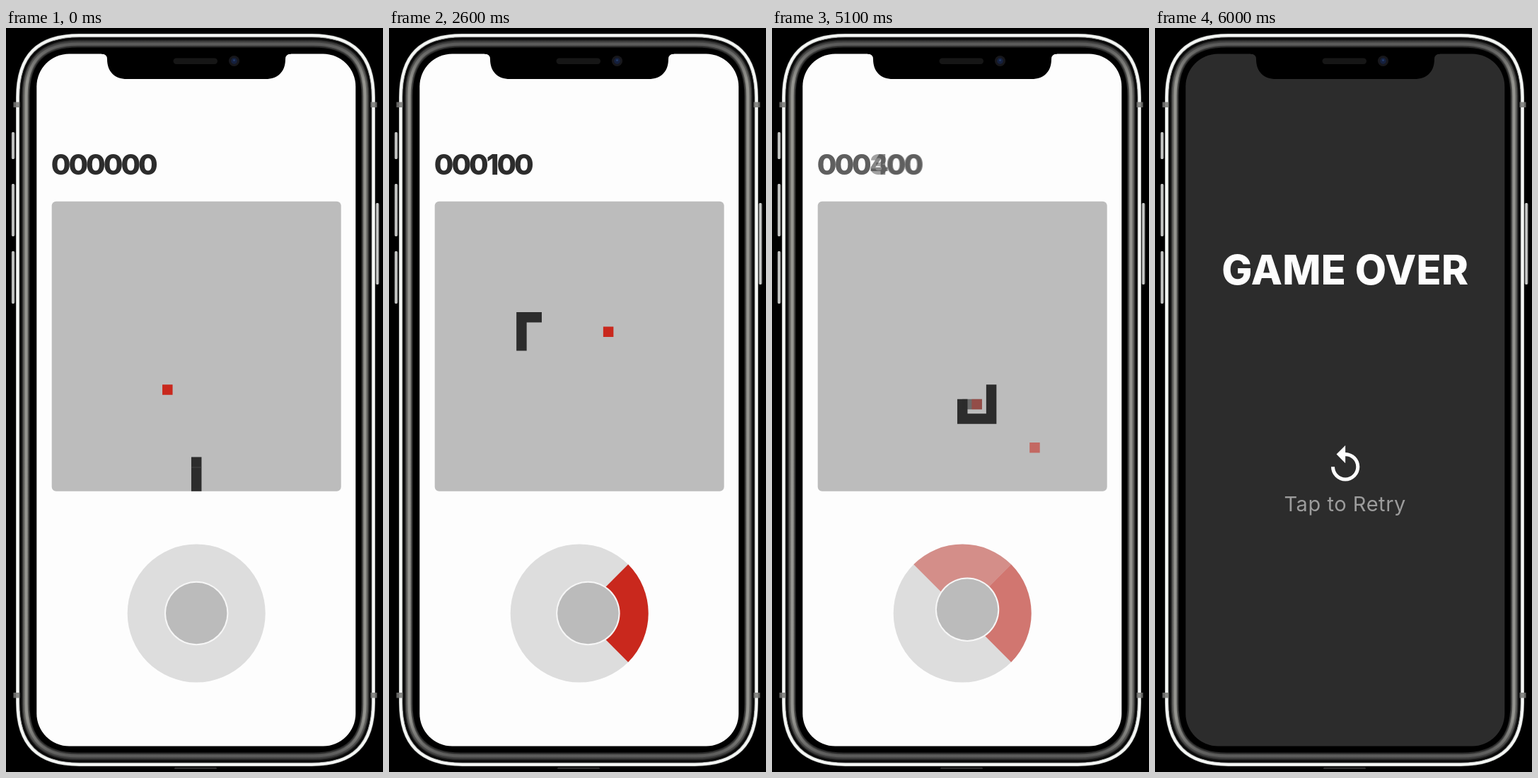
An HTML page with a canvas for the animation above (6200 ms loop, 533 by 1050 pixels).

```html
<!DOCTYPE html>
<html lang="en">
<head>
<meta charset="utf-8">
<title>Snake</title>
<style>
  html, body { margin: 0; width: 100%; height: 100%; overflow: hidden; background: #000; }
  canvas { display: block; }
</style>
</head>
<body>
<canvas id="stage" width="533" height="1050"></canvas>
<script>
const ctx = document.getElementById('stage').getContext('2d');
const LOOP = 6200, FRAME = 100;
const DARK = '#2c2c2c', LIGHT = '#fdfdfd', RED = '#c9281d', GREY = '#bcbcbc';
const CELL = 20.45, BLOCK = 14.5, MID = { x: 269.2, y: 449.2 };
const WHEEL = { x: 269.2, y: 826, r: 97.5 };
const FONT = 'Inter, "Open Sans", sans-serif';

const DIRS = { U: [0, -1], D: [0, 1], L: [-1, 0], R: [1, 0] };
const LEAD = 3; // cells behind the head's first position
const moves = [...'UUU' + 'UUUUU' + 'LLLL' + 'UUUUU' + 'RRRRRR' + 'DDDDDDD' + 'LL' + 'U' + 'RR'];
const path = [[0, 8 + LEAD]];
for (const m of moves) {
  const [x, y] = path.at(-1), [dx, dy] = DIRS[m];
  path.push([x + dx, y + dy]);
}
const STEPS = moves.length - LEAD;
const meals = [7, 21, 29, 31]; // steps on which food is reached
const foods = [...meals.map(k => path[k + LEAD]), [5, 7]];

const clamp = v => Math.min(1, Math.max(0, v));
const mix = (a, b, p) => a + (b - a) * p;
const grey = v => `rgb(${v},${v},${v})`;
const smooth = v => (v = clamp(v), v * v * (3 - 2 * v));
const eaten = k => meals.filter(m => m <= k).length;
const center = ([x, y]) => [MID.x + x * CELL, MID.y + y * CELL];

function cellAt(i) {
  i += LEAD;
  const n = Math.floor(i), a = path[n], b = path[n + 1] || a;
  return [mix(a[0], b[0], i - n), mix(a[1], b[1], i - n)];
}

function box(x, y, w, h, r, fill) {
  ctx.beginPath();
  ctx.roundRect(x, y, w, h, r);
  ctx.fillStyle = fill;
  ctx.fill();
}

function disc(x, y, r, fill) {
  ctx.beginPath();
  ctx.arc(x, y, r, 0, 7);
  ctx.fillStyle = fill;
  ctx.fill();
}

// Outline of the phone with continuous-curvature corners.
function rim(inset, width, color) {
  const cx = 268, cy = 525, w = cx - inset, h = cy - inset + 6;
  const e = 1.19 * (90 - inset), c = e * .32;
  ctx.beginPath();
  for (const [sx, sy] of [[-1, -1], [1, -1], [1, 1], [-1, 1]]) {
    const at = (dx, dy) => [cx + sx * (w - dx), cy + sy * (h - dy)];
    const curve = [at(0, e), at(0, c), at(c, 0), at(e, 0)];
    if (sx !== sy) curve.reverse();
    const [from, a, b, to] = curve;
    ctx.lineTo(...from);
    ctx.bezierCurveTo(...a, ...b, ...to);
  }
  ctx.closePath();
  ctx.lineWidth = width;
  ctx.strokeStyle = color;
  ctx.stroke();
}

function ramp(x0, y0, x1, y1, ...stops) {
  const g = ctx.createLinearGradient(x0, y0, x1, y1);
  stops.forEach(([at, color]) => g.addColorStop(at, color));
  return g;
}

function text(str, x, y, font, color, align = 'left', spacing = 0) {
  ctx.font = `${font} ${FONT}`;
  ctx.letterSpacing = spacing + 'px';
  ctx.textAlign = align;
  ctx.fillStyle = color;
  ctx.fillText(str, x, y);
}

function withAlpha(a, draw) {
  const old = ctx.globalAlpha;
  ctx.globalAlpha = old * clamp(a);
  draw();
  ctx.globalAlpha = old;
}

function drawPhone() {
  ctx.fillStyle = '#000';
  ctx.fillRect(0, 0, 533, 1050);
  for (const [x, y, h] of [[7.5, 147, 38], [7.5, 220, 74], [7.5, 315, 74], [522.5, 247, 115]])
    box(x, y, 5, h, 2, ramp(x, 0, x + 5, 0, [0, '#555'], [.45, '#e4e6e4'], [1, '#777']));

  rim(16.7, 5.4, '#a9aba9');
  rim(16.5, 3.6, '#f5f7f5');
  rim(20.8, 2.6, '#0b0b0b');
  const band = (edge, side) => ramp(0, 14, 0, 1036, [0, edge], [.06, side], [.94, side], [1, edge]);
  rim(28, 11, band('#242424', '#333332'));
  rim(28, 7.5, band('#3c3c3c', '#62625f'));
  rim(28.5, 4, band('#525252', '#94948f'));

  for (const y of [104.5, 938])
    for (const x of [10.5, 515.5]) box(x, y, 9, 7.5, 0, 'rgba(120,120,118,.85)');
  box(238, 1043.5, 60, 2, 1, '#3a3a3a');
}

function drawNotch() {
  ctx.fillStyle = '#000';
  ctx.fill(new Path2D('M135 35V36.5Q143 36.5 143 44C143 62 154 72 171 72H367C384 72 395 62 395 44Q395 36.5 403 36.5V35Z'));
  box(236.5, 42.5, 62.5, 8.5, 4.2, '#161616');
  disc(322.5, 46.5, 7.6, '#17171b');
  disc(322.5, 46.5, 4.4, '#15203d');
  disc(322.5, 45.5, 1.6, '#223a66');
}

function drawFood(i, alpha) {
  const [x, y] = center(foods[i]);
  withAlpha(alpha, () => box(x - BLOCK / 2, y - BLOCK / 2, BLOCK, BLOCK, 0, RED));
}

function line(from, to) {
  const cells = [cellAt(from)];
  for (let i = Math.floor(from) + 1; i < to; i++) cells.push(cellAt(i));
  cells.push(cellAt(to));
  ctx.beginPath();
  cells.map(center).forEach(pt => ctx.lineTo(...pt));
  ctx.lineWidth = BLOCK;
  ctx.lineCap = 'square';
  ctx.lineJoin = 'miter';
  ctx.strokeStyle = DARK;
  ctx.stroke();
}

function drawSnake(k, p, eats, turns) {
  const tail = mix(k - 2 - eaten(k), k + 1 - 2 - eaten(k + 1), p);
  if (eats && turns) {
    line(tail, k);
    withAlpha(p, () => line(k + .35, k + 1));
  } else line(tail, k + p);

  if (p < .03 && k < STEPS) { // hairline behind a resting head
    const [x, y] = center(cellAt(k)), [dx, dy] = DIRS[moves[k + LEAD - 1]], h = BLOCK / 2;
    ctx.beginPath();
    ctx.moveTo(x - dx * h - dy * h, y - dy * h - dx * h);
    ctx.lineTo(x - dx * h + dy * h, y - dy * h + dx * h);
    ctx.lineWidth = .7;
    ctx.lineCap = 'butt';
    ctx.strokeStyle = '#505050';
    ctx.stroke();
  }
}

function drawWheel(was, next, p, q) {
  const { x, y, r } = WHEEL;
  disc(x, y, r, grey(mix(221, 44, q)));
  const sector = (dir, alpha) => dir && withAlpha(alpha, () => {
    const [dx, dy] = DIRS[dir], a = Math.atan2(dy, dx);
    ctx.beginPath();
    ctx.moveTo(x, y);
    ctx.arc(x, y, r, a - Math.PI / 4, a + Math.PI / 4);
    ctx.fillStyle = RED;
    ctx.fill();
  });
  if (was === next) sector(was, 1);
  else {
    sector(was, 1 - p);
    sector(next, p);
  }
  if (q > 0) {
    ctx.beginPath();
    for (const s of [-1, 1]) {
      ctx.moveTo(x - 68, y + s * 68);
      ctx.lineTo(x - 30, y + s * 30);
    }
    ctx.lineWidth = .6;
    ctx.strokeStyle = '#e8e8e8';
    ctx.stroke();
  }
  const a = DIRS[was] || [0, 0], b = DIRS[next];
  const kx = x + 12.2 * mix(a[0], b[0], p), ky = y + 12.2 * mix(a[1], b[1], p);
  disc(kx, ky, 45.2, '#f6f6f6');
  disc(kx, ky, 43.2, '#bbbbbb');
}

function drawGame(t, q) {
  const u = t - 1.1;
  const raw = Math.min(STEPS, Math.max(0, 6.33 + 5.87 * u + .045 * u * u));
  const k = Math.floor(raw), p = smooth((raw - k - .15) / .7);
  const was = k ? moves[k + LEAD - 1] : null, next = moves[k + LEAD] || was;
  const n = eaten(k), eats = eaten(k + 1) > n;

  ctx.save();
  ctx.globalAlpha = 1 - q * q;
  const size = 1 - .56 * q;
  ctx.translate(MID.x, 370);
  ctx.scale(size, size);
  ctx.translate(-MID.x, -370);

  const score = (i, alpha) => withAlpha(alpha, () =>
    text(String(i * 100).padStart(6, '0'), 63.7, 207, '800 40px', DARK, 'left', -3));
  score(n, eats ? 1 - p : 1);
  if (eats) score(n + 1, p);

  drawWheel(was, next, p, q);

  box(64.7, 244.7, 409, 409, q > 0 ? [6, 0, 0, 0] : 6, GREY);
  ctx.clip();
  ctx.setTransform(1, 0, 0, 1, 117 * q, 78 * q); // blocks keep their size
  if (!eats) drawFood(n, 1);
  else drawFood(n + 1, p);
  const turns = was !== next;
  if (eats && !turns) drawFood(n, p < .3 ? 1 : (1 - p) / .7);
  drawSnake(k, p, eats, turns);
  if (eats && turns) drawFood(n, 1 - p);
  ctx.restore();
}

function drawGameOver() {
  text('GAME OVER', 268.7, 361.5, '800 57.5px', LIGHT, 'center', .25);
  ctx.save();
  ctx.translate(238.9, 586.5);
  ctx.scale(2.52, 2.52);
  ctx.fillStyle = LIGHT;
  ctx.fill(new Path2D('M12 5V1L7 6l5 5V7a6 6 0 1 1-6 6H4a8 8 0 1 0 8-8z'));
  ctx.restore();
  text('Tap to Retry', 268.7, 681.5, '400 29px', '#9c9c9c', 'center', .55);
}

function render(now) {
  const t = Math.floor(now % LOOP / FRAME) * FRAME / 1000;
  const q = smooth((t - 5.66) / .3);
  drawPhone();
  ctx.save();
  box(43.3, 36.5, 451, 977, 46, grey(mix(253, 44, q)));
  ctx.clip();
  if (q < 1) drawGame(t, q);
  withAlpha(q, drawGameOver);
  ctx.restore();
  drawNotch();
}

const start = performance.now();
function tick() {
  render(performance.now() - start);
  requestAnimationFrame(tick);
}
tick();
</script>
</body>
</html>
```
